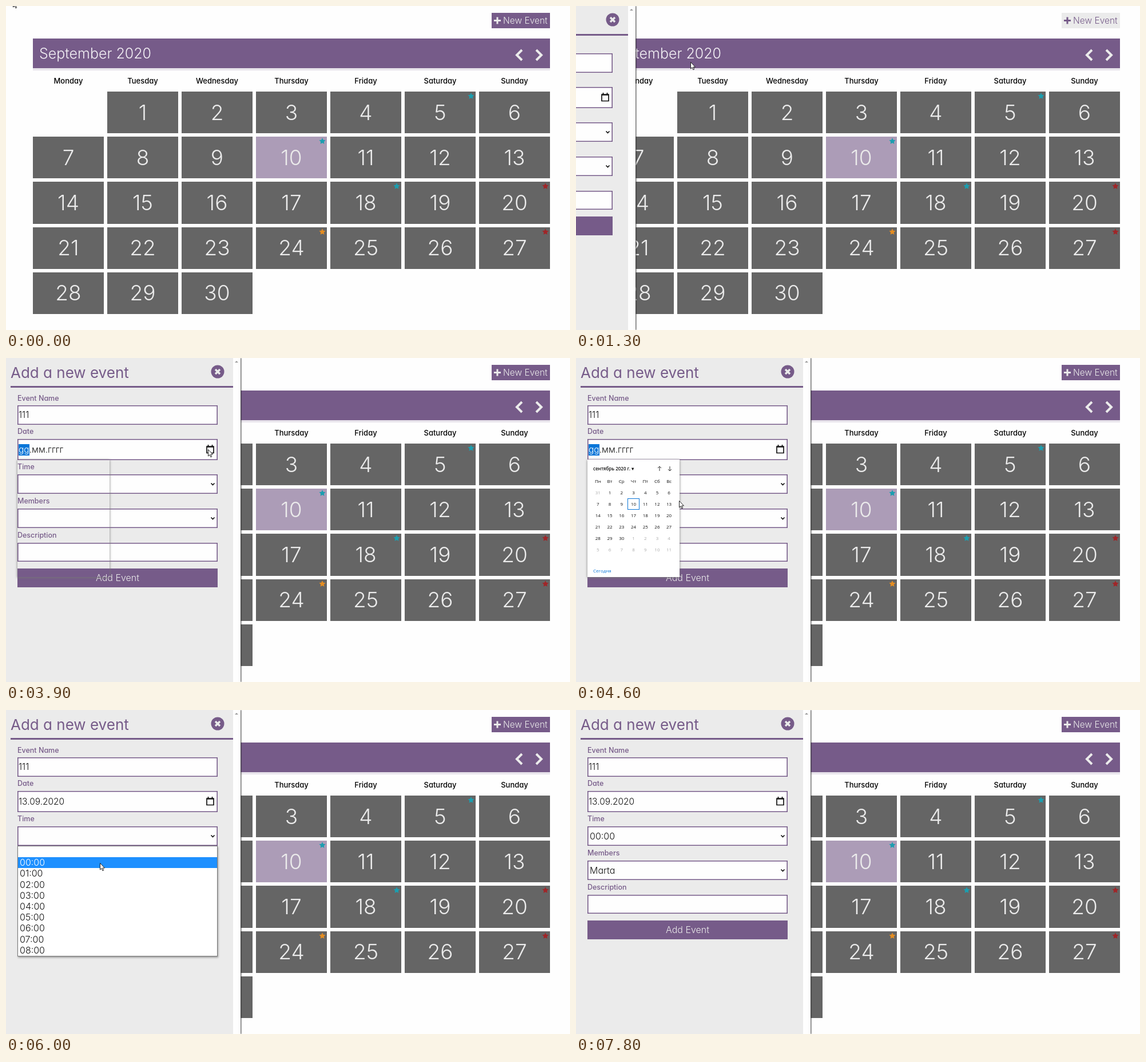
These frames come from a looping animation (986x568 px, 8 s). An HTML page:

```html
<!DOCTYPE html>
<html lang="en">
<head>
<meta charset="utf-8">
<title>Event calendar</title>
<style>
  :root { --purple: #765b89; --light: #ebebeb; --blue: #1e90ff; }
  * { box-sizing: border-box; }
  html, body { margin: 0; width: 100%; height: 100%; overflow: hidden; background: #fefefe; }
  body {
    position: relative;
    font: 300 16px/20px Inter, "Open Sans", sans-serif;
    font-feature-settings: "cv11";
    color: #111;
  }
  svg { position: absolute; overflow: visible; fill: none; }
  .abs, .abs > i { position: absolute; font-style: normal; white-space: pre; }

  .new { left: 849px; top: 12px; width: 102px; height: 27px; padding: 4px 0 0 20px;
    font-size: 15.5px; background: var(--purple); color: var(--light); }
  .new.hover { background: var(--light); color: var(--purple); }
  .new svg { left: 4px; top: 7px; stroke: currentColor; stroke-width: 3; }

  .bar { left: 47px; top: 57px; width: 904px; height: 56px; padding: 16px 11px;
    font-size: 25px; background: var(--purple); color: #f3f0f5; border-bottom: 4px solid #e9e5ec; }
  .bar svg { stroke: var(--light); stroke-width: 4; top: 20px; }

  .days, .grid { left: 47px; width: 904px; display: grid; grid-template-columns: repeat(7, 1fr); gap: 6px; text-align: center; }
  .days { top: 121px; font-size: 13px; font-weight: 500; color: #000; }
  .grid { top: 150px; height: 390px; grid-template-rows: repeat(5, 1fr); }
  .cell { position: relative; display: grid; place-items: center; background: #656565; color: var(--light); font-size: 37px; }
  .cell.today { background: #ac9cb7; }
  .cell svg { right: 2px; top: 2px; }

  .panel { left: 0; top: 0; width: 410px; height: 568px; background: #fefefe; box-shadow: 1px 0 2px #333; }
  .sheet { left: 0; top: 0; width: 397px; height: 568px; background: var(--light); color: var(--purple); }
  .title { left: 8px; top: 0; width: 389px; height: 52px; padding-top: 16px;
    font-size: 26px; font-weight: 400; border-bottom: 3px solid var(--purple); }
  .label { left: 20px; font-size: 12.5px; font-weight: 500; }
  .field { left: 20px; width: 350px; background: #fefefe; box-shadow: inset 0 0 0 1.6px var(--purple); color: #111; }
  .field > i { left: 2px; top: calc(50% - 10px); font-size: 15.5px; }
  .field > .pick { left: 4px; font-size: 16px; }
  .mark { background: #0a76d8; color: #fff; }
  .add { left: 20px; top: 369px; width: 350px; height: 33px; line-height: 33px; text-align: center;
    background: var(--purple); color: var(--light); }

  .caret { top: 91px; width: 1px; height: 18px; background: #111; }
  .hints { left: 20px; top: 117px; width: 141px; height: 65px; padding: 7px 9px; background: #fff;
    box-shadow: 0 1px 2px #888; font: 10.5px/26px "Open Sans", sans-serif; }
  .list { left: 20px; width: 350px; background: #fff; border: 1px solid #777; box-shadow: 1px 2px 3px #999; }
  .row { position: relative; height: 19.2px; line-height: 19.2px; padding-left: 3px; }
  .row i { position: absolute; inset: 0; padding-left: 3px; font-style: normal; background: var(--blue); color: #fff; }

  .picker { left: 20px; top: 178px; width: 161px; height: 206px; background: #fff; box-shadow: 0 1px 4px #777;
    font: 8px/20px "Open Sans", sans-serif; }
  .ghost { background: none; }
  .month { left: 10px; top: 6px; font-weight: 600; }
  .dates { left: 8px; top: 28px; width: 145px; display: grid; grid-template-columns: repeat(7, 1fr); text-align: center; }
  .dates .out { color: #aaa; }
  .dates .now { box-shadow: inset 0 0 0 1px #0a76d8; }
  #cursor { left: 0; top: 0; fill: #fff; stroke: #222; stroke-width: 1; }
</style>
</head>
<body>
<div class="abs new">New Event<svg width="12" height="12"><path d="M0 6.5H12M6 .5V12.5"/></svg></div>
<div class="abs new hover" data-on="800 1400">New Event<svg width="12" height="12"><path d="M0 6.5H12M6 .5V12.5"/></svg></div>

<div class="abs bar">September 2020
  <svg style="left:845px" width="12" height="19"><path d="M10 0L1 9L10 18"/></svg>
  <svg style="left:879px" width="12" height="19"><path d="M1 0L10 9L1 18"/></svg>
</div>
<div class="abs days"></div>
<div class="abs grid"></div>

<div class="abs panel" id="panel">
  <svg style="left:400px;top:5px" width="6" height="4"><path fill="#999" d="M0 3L3 0L6 3z"/></svg>
  <div class="abs sheet">
    <div class="abs title">Add a new event</div>
    <svg style="left:358px;top:12px" width="24" height="24">
      <circle cx="12" cy="12" r="11.5" fill="#765b89"/>
      <path d="M8 8L16 16M16 8L8 16" stroke="#ebebeb" stroke-width="3.4"/>
    </svg>
    <div id="form"></div>
    <div class="abs add">Add Event</div>
  </div>

  <div class="abs caret" style="left:21px" data-on="1900 2400"></div>
  <div class="abs caret" style="left:42px" data-on="3000 3500"></div>
  <div class="abs hints" data-on="1900 2600">99
44</div>
  <div class="abs picker ghost" data-on="3900 4000"></div>
  <div class="abs picker" data-on="4000 4800">
    <div class="abs month">сентябрь 2020 г. ▾</div>
    <svg style="left:122px;top:12px;stroke:#333" width="30" height="8"><path d="M4 8V0M1 3L4 0L7 3M22 0V8M19 5L22 8L25 5"/></svg>
    <div class="abs dates"></div>
    <div class="abs" style="left:10px;top:185px;color:#0a76d8">Сегодня</div>
  </div>
  <div class="abs list" id="times" style="top:238px" data-on="5700 6200"></div>
  <div class="abs list" id="members" style="top:298px" data-on="6600 7700"></div>
</div>

<svg id="cursor" width="9" height="15"><path d="M.5 .5V12L3.1 9.6L4.9 13.8L6.7 13L4.9 9H8.5z"/></svg>

<script>
const LOOP = 8000, LEAD = 15; // switch slightly early so each step is settled on its tick
const $ = s => document.querySelector(s);
const fill = (s, html) => { $(s).innerHTML = html; };
const range = n => [...Array(n).keys()];

// Calendar
const stars = { 5: '#1b9fb0', 10: '#1b9fb0', 18: '#1b9fb0', 20: '#a02629', 24: '#e48d22', 27: '#a02629' };
const starPath = 'M' + range(10).map(i => {
  const r = i % 2 ? 2.9 : 5.8, a = i * Math.PI / 5;
  return `${(6 + r * Math.sin(a)).toFixed(2)} ${(6 - r * Math.cos(a)).toFixed(2)}`;
}).join('L') + 'z';
const star = c => c ? `<svg width="12" height="12"><path d="${starPath}" fill="${c}"/></svg>` : '';

fill('.days', ['Mon', 'Tues', 'Wednes', 'Thurs', 'Fri', 'Satur', 'Sun'].map(d => `<div>${d}day</div>`).join(''));
fill('.grid', '<div></div>' + range(30).map(i => i + 1).map(d =>
  `<div class="cell${d === 10 ? ' today' : ''}">${d}${star(stars[d])}</div>`).join(''));

// Form
const arrow = '<svg style="right:5px;top:15px" width="7" height="5"><path d="M.5 .5L3.5 3.5L6.5 .5" stroke="#111" stroke-width="1.7"/></svg>';
const icon = '<svg style="right:6px;top:10px" width="14" height="16"><path d="M1 3H13V14.5H1zM1 4H13M3.5 0V3M10.5 0V3" stroke="#111" stroke-width="1.7"/></svg>';
const text = (on, s, cls = '') => `<i class="${cls}" data-on="${on}">${s}</i>`;
const date = (on, lit, day, rest) =>
  text(on, day + rest) + text(lit, day, 'mark');

const fields = [
  ['Event Name', 71, 83, 34, text('2600 2700', '1') + text('2700 3000', '11') + text('3000 8000', '111')],
  ['Date', 129, 142, 37, date('0 4800', '3900 4800', 'gg', '.мм.гггг')
    + date('4800 8000', '4800 5700', '13', '.09.2020') + icon],
  ['Time', 191, 204, 34, text('6200 8000', '00:00', 'pick') + arrow],
  ['Members', 251, 264, 34, text('7700 8000', 'Marta', 'pick') + arrow],
  ['Description', 311, 324, 33, '']
];
fill('#form', fields.map(([name, mid, top, h, body]) =>
  `<div class="abs label" style="top:${mid - 10}px">${name}</div>
   <div class="abs field" style="top:${top}px;height:${h}px">${body}</div>`).join(''));

// Pop-ups
const rows = (names, lit) => names.map((s, i) =>
  `<div class="row">${s}${lit[i] ? `<i data-on="${lit[i]}">${s}</i>` : ''}</div>`).join('');
fill('#times', rows(['', ...range(9).map(h => `0${h}:00`)], ['5700 5900', '5900 6200']));
fill('#members', rows(['', 'Oleg', 'Marta', 'Tim', 'Gregory'],
  ['6600 6800', '6800 6900 7000 7300', '7300 7700', '6900 7000']));

fill('.dates', ['Пн', 'Вт', 'Ср', 'Чт', 'Пт', 'Сб', 'Вс'].map(d => `<div>${d}</div>`).join('') + range(42).map(i => {
  const cls = i < 1 || i > 30 ? 'out' : i === 10 ? 'now' : '';
  return `<div class="${cls}">${i < 1 ? 31 : i > 30 ? i - 30 : i}</div>`;
}).join(''));

// Motion: stepped keyframes from [time, declaration] pairs
const sheet = document.head.appendChild(document.createElement('style'));
let count = 0;
function track(el, steps) {
  const name = 'k' + count++;
  const body = steps.map(([t, css]) => `${Math.max(0, t - LEAD) / LOOP * 100}%{${css}}`).join('');
  sheet.append(`@keyframes ${name}{${body}}\n`);
  el.style.animation = `${name} ${LOOP}ms step-end infinite`;
}

document.querySelectorAll('[data-on]').forEach(el => {
  const times = el.dataset.on.split(' ').map(Number);
  const steps = times.map((t, i) => [t, `opacity:${1 - i % 2}`]).filter(([t]) => t < LOOP);
  if (times[0] > 0) steps.unshift([0, 'opacity:0']);
  track(el, steps);
});

const slide = t => {
  const u = Math.min(1, Math.max(0, (t - 1027) / 800));
  return -414 * (1 + Math.cos(Math.PI * u)) / 2;
};
track($('#panel'), [0, ...range(9).map(i => 1100 + i * 100)].map(t =>
  [t, `transform:translateX(${Math.round(slide(t))}px)`]));

const off = -40;
const path = [
  [0, 12, -10], [100, 70, 15], [200, 200, 60], [300, 370, 92], [400, 540, 98], [500, 690, 84],
  [600, 800, 58], [700, 872, 34], [800, 900, 27], [1100, 620, 62], [1200, 238, 93], [1300, 200, 98],
  [1500, off, off], [3300, 270, 178], [3400, 318, 174], [3500, 340, 168], [3600, 349, 163], [3800, 353, 160],
  [4100, 330, 176], [4200, 286, 204], [4300, 238, 228], [4400, 200, 244], [4500, 180, 250], [4700, 170, 252],
  [4900, 177, 244], [5000, 181, 238], [5200, 181, 232], [5300, 181, 227], [5400, 181, 224],
  [5900, 169, 262], [6000, 164, 268], [6300, 163, 267], [6800, 163, 324], [6900, 160, 368],
  [7000, 158, 329], [7300, 157, 341], [7400, 157, 344], [7800, off, off]
];
track($('#cursor'), path.map(([t, x, y]) => [t, `transform:translate(${x}px,${y}px)`]));
</script>
</body>
</html>
```
